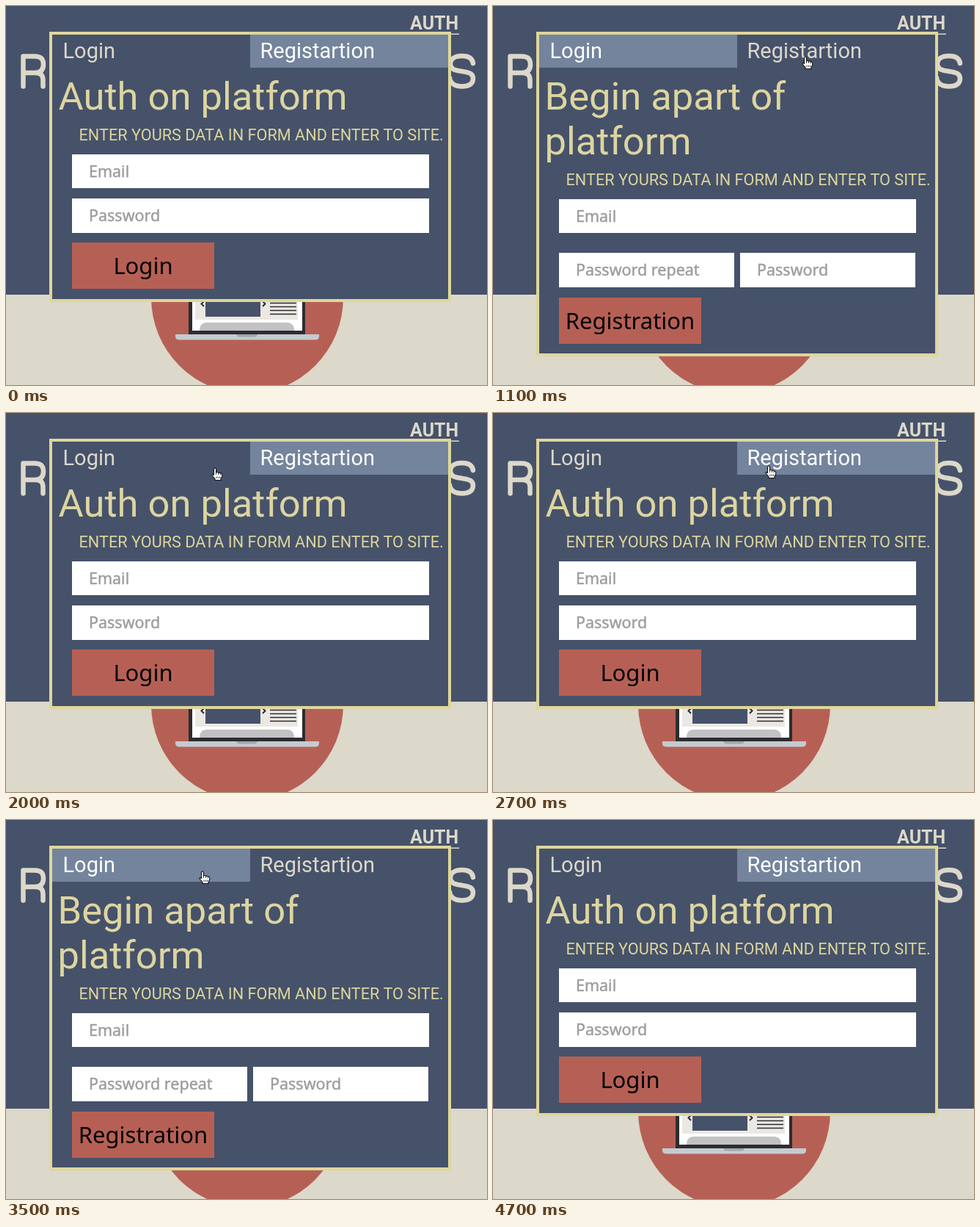
Write an HTML page that moves like this. It is 656 px wide and 516 px high and loops after 4800 ms.

```html
<!DOCTYPE html>
<html lang="en">
<head>
<meta charset="utf-8">
<title>Auth dialog</title>
<style>
html, body { margin: 0; width: 100%; height: 100%; overflow: hidden; background: #46526a; }
svg { display: block; width: 656px; height: 516px; }
text { font-family: Roboto, sans-serif; white-space: pre; }
.title { fill: none; stroke: #dcd8ca; stroke-width: 6.5; stroke-linecap: round; stroke-linejoin: round; }
.auth { font-size: 25px; font-weight: 700; fill: #dcd8ca; }
.tab { font-size: 29px; fill: #dcd8ca; }
.tab.off { fill: #fff; }
.head { font-size: 52.5px; fill: #ddd5a0; }
.sub { font-size: 21.7px; fill: #ddd59b; }
.hint, .btn { font-family: "Noto Sans", "Open Sans", sans-serif; }
.hint { font-size: 21.5px; fill: #9d9da0; stroke: #9d9da0; stroke-width: .45; }
.btn { font-size: 31px; text-anchor: middle; fill: #000; }
.box { fill: #46526a; stroke: #dfd69b; stroke-width: 4; }
.red { fill: #b66055; }
</style>
</head>
<body>
<svg viewBox="0 0 656 516">
  <rect width="656" height="516" fill="#46526a"/>
  <rect y="393" width="656" height="123" fill="#dcd8ca"/>
  <text class="auth" x="551" y="32">AUTH</text>
  <rect x="551" y="37.5" width="67" height="1.5" fill="#dcd8ca"/>
  <g class="title">
    <path d="M23.5 109.5V68.5H39C48 68.5 51 73 51 79.5S48 91 39 91H24M40 91C48 91 50.5 95 50.5 101V109.5"/>
    <path d="M637 78C636 71 631 68 622 68C612 68 606 72 606 79C606 87 614 87.500 622 89C632 90.500 637 92 637 99C637 107 630 109.500 622 109.500C613 109.500 606 106 605 98"/>
  </g>

  <circle class="red" cx="329" cy="397" r="131"/>
  <g id="laptop">
    <path d="M249 340H408V447H249Z" fill="#2d2d30"/>
    <path d="M254 345H404V442H254Z" fill="#fff"/>
    <path d="M258 380H398V427H258Z" fill="#ebe7e3"/>
    <path d="M272 380H347V423H272Z" fill="#46526a"/>
    <path d="M270 402L266.500 405.500L270 409M350 402L353.500 405.500L350 409" fill="none" stroke="#2d2d30" stroke-width="2"/>
    <path d="M360 404.500H396M360 409.500H396M360 414.500H396M360 419.500H396" stroke="#2d2d30" stroke-width="1.7"/>
    <path d="M264 442C264 435 267 431 274 431H383C390 431 393 435 393 442Z" fill="#c2c2c4"/>
    <path d="M231 447H427V450Q427 454.500 421 454.500H237Q231 454.500 231 450Z" fill="#c4cbd0"/>
    <path d="M314 447H343Q342 450.500 338 450.500H319Q315 450.500 314 447Z" fill="#9fa8ae"/>
  </g>

  <g id="login"></g>
  <g id="signup"></g>

  <g id="cursor" fill="#fff" stroke="#111" stroke-width="1.1" stroke-linejoin="round">
    <g id="hand">
      <path d="M-1.500 1Q0 -1 1.500 1V6Q3.500 4.800 4.500 6.500Q6.500 5.500 7.300 7.300Q9.500 6.500 9.700 9V11.500L8 14V16.500H0V14.500L-4 10Q-4.500 7.500 -1.500 9.500Z"/>
      <path d="M1.500 6V9M4.500 6.500V9M7.300 7.300V9.500M2 11.500V14M4.300 11.500V14M6.600 11.500V14" fill="none" stroke-width=".8"/>
    </g>
    <path id="arrow" d="M0 0V15L3.500 11.700L6 17.500L8.500 16.500L6 10.800H10.500Z" fill="#111" stroke="#fff"/>
  </g>
</svg>
<script>
const LOOP = 4800, STEP = 100;
const byId = id => document.getElementById(id);
const rect = (x, y, w, h, fill) => `<rect x="${x}" y="${y}" width="${w}" height="${h}" fill="${fill}"/>`;
const text = (cls, x, y, s) => `<text class="${cls}" x="${x}" y="${y}">${s}</text>`;
const field = (x, y, w, h, s) => rect(x, y, w, h, "#fff") + text("hint", x + 23, y + 31, s);
const button = (y, s) => rect(90, y, 194, 63, "#b66055") + text("btn", 187, y + 43, s);

// Dialog frame with its two tabs; the inactive tab is the lighter one.
function panel(height, active) {
  const off = i => i === active ? "" : " off";
  return `<rect class="box" x="61" y="37" width="544" height="${height - 4}"/>` +
    rect(active ? 63 : 333, 39, 270, 45, "#74849d") +
    text("tab" + off(0), 77.5, 71, "Login") +
    text("tab" + off(1), 346.5, 71, "Registartion");
}

const note = "ENTER YOURS DATA IN FORM AND ENTER TO SITE.";

byId("login").innerHTML = panel(368, 0) +
  text("head", 71.5, 141, "Auth on platform") +
  text("sub", 99.5, 183, note) +
  field(90, 202, 487, 46, "Email") +
  field(90, 262, 487, 47, "Password") +
  button(322, "Login");

byId("signup").innerHTML = panel(442, 1) +
  text("head", 70.5, 141, "Begin apart of") +
  text("head", 70.5, 202, "platform") +
  text("sub", 99.5, 244, note) +
  field(90, 263, 487, 46, "Email") +
  field(90, 336, 239, 47, "Password repeat") +
  field(337, 336, 239, 47, "Password") +
  button(397, "Registration");

// Pointer tip: time, x, y
const path = [
  [400, 520, 530], [900, 426, 69], [1200, 426, 69], [1800, 285, 75],
  [2100, 285, 75], [2600, 376, 72], [2900, 376, 72], [3500, 268, 70],
  [3900, 268, 70], [4400, 400, 530]
];
const clicks = [1100, 2000, 2800, 3700];

function tip(t) {
  const i = path.findIndex(p => p[0] >= t);
  if (i < 1) return null;
  const [a, b] = [path[i - 1], path[i]];
  const k = (t - a[0]) / (b[0] - a[0]);
  const e = k * k * (3 - 2 * k);
  return [a[1] + (b[1] - a[1]) * e, a[2] + (b[2] - a[2]) * e];
}

const show = (id, on) => byId(id).style.display = on ? "" : "none";

function draw(now) {
  const t = Math.floor(now % LOOP / STEP) * STEP;
  const signup = clicks.filter(c => c <= t).length % 2 === 1;
  show("login", !signup);
  show("signup", signup);

  const p = tip(t);
  show("cursor", p);
  if (p) {
    const onTab = p[1] > 39 && p[1] < 84;
    show("hand", onTab);
    show("arrow", !onTab);
    byId("cursor").setAttribute("transform", `translate(${p[0].toFixed(1)} ${p[1].toFixed(1)})`);
  }
}

const start = performance.now();
function tick() {
  draw(performance.now() - start);
  requestAnimationFrame(tick);
}
tick();
</script>
</body>
</html>
```
